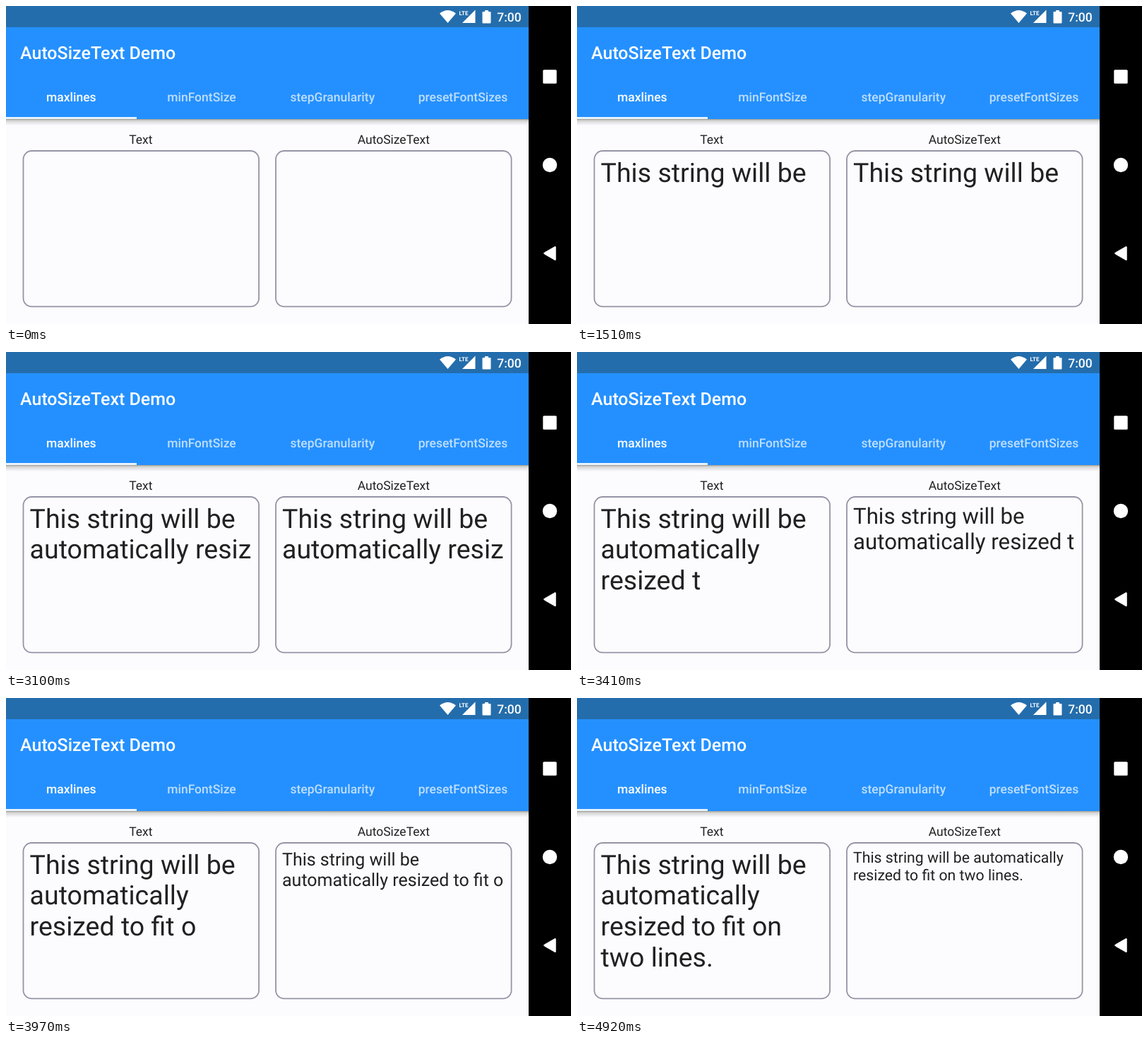
Write an HTML page that moves like this. It is 800 px wide and 450 px high and loops after 7970 ms.

```html
<!DOCTYPE html>
<html lang="en">
<head>
<meta charset="utf-8">
<title>AutoSizeText Demo</title>
<style>
  html, body { margin: 0; width: 100%; height: 100%; overflow: hidden; }
  svg { display: block; font: 17.5px Roboto, sans-serif; text-rendering: geometricPrecision; }
  .medium { font-weight: 500; fill: #fff; }
  .mid { text-anchor: middle; }
  .dim { fill-opacity: .7; }
  .ink { fill: #212121; }
  .white { fill: #fff; }
  .frame { fill: none; stroke: #9494a6; stroke-width: 1.8; }
</style>
</head>
<body>
<svg width="800" height="450" viewBox="0 0 800 450">
  <defs>
    <linearGradient id="shadow" x2="0" y2="1">
      <stop offset="0" stop-color="#4a3c10" stop-opacity=".5"/>
      <stop offset=".25" stop-color="#333328" stop-opacity=".2"/>
      <stop offset="1" stop-color="#333" stop-opacity="0"/>
    </linearGradient>
  </defs>
  <rect width="800" height="450" fill="#fcfcff"/>
  <rect y="160" width="740" height="9" fill="url(#shadow)"/>

  <!-- app bar -->
  <rect width="740" height="160" fill="#2490ff"/>
  <rect width="740" height="30" fill="#246dac"/>
  <rect y="157.2" width="185" height="2.6" class="white"/>
  <text x="20" y="74.5" class="medium" font-size="25">AutoSizeText Demo</text>
  <g class="medium mid">
    <text x="92.3" y="135">maxlines</text>
    <g class="dim">
      <text x="277" y="135">minFontSize</text>
      <text x="462.3" y="135">stepGranularity</text>
      <text x="647" y="135">presetFontSizes</text>
    </g>
    <text x="712.5" y="22">7:00</text>
  </g>

  <!-- status icons -->
  <g class="white">
    <path d="M614 10.5Q625.5 1.5 637 10.5L625.5 24Z"/>
    <path d="M664.5 5.5V24H646Z"/>
    <path d="M678 6h5v2h2.5q1 0 1 1v14.5q0 1-1 1h-10q-1 0-1-1V9q0-1 1-1H678Z"/>
    <text x="641.5" y="13" font-size="8" font-weight="700" font-stretch="75%">LTE</text>
  </g>

  <!-- navigation bar -->
  <rect x="740" width="60" height="450"/>
  <g class="white">
    <rect x="760.3" y="90.3" width="19.4" height="19.4" rx="1.5"/>
    <circle cx="770" cy="225" r="10.2"/>
    <path d="M762.5 350L777.5 341.3V358.7Z" stroke="#fff" stroke-width="2.5" stroke-linejoin="round"/>
  </g>

  <!-- panels -->
  <g class="ink mid">
    <text x="190.8" y="195">Text</text>
    <text x="548.8" y="195">AutoSizeText</text>
  </g>
  <rect class="frame" x="24.5" y="205" width="333.6" height="220.4" rx="12"/>
  <rect class="frame" x="382" y="205" width="333.6" height="220.4" rx="12"/>
  <g class="ink" id="plain"></g>
  <g class="ink" id="fitted"></g>
</svg>
<script>
const LOOP = 7970, DP = 1.25, MAX_SIZE = 30, MIN_SIZE = 12;
const WIDTH = 314.6, TOP = 213.75, ASCENT = 0.9277, LINE = 1.1719;
const MESSAGE = 'This string will be automatically resized to fit on two lines.';

// [letters typed, time in ms]; typing is steady between these points
const TYPING = [
  [0, 0], [1, 40], [4, 290], [6, 460], [9, 680], [11, 850], [13, 1020], [16, 1200],
  [18, 1380], [19, 1510], [21, 1630], [27, 2150], [28, 2190], [31, 2450], [32, 2530],
  [37, 2930], [38, 3020], [41, 3240], [43, 3410], [44, 3500], [46, 3670], [48, 3800],
  [50, 3970], [51, 4060], [55, 4360], [57, 4540], [62, 4920]
];

const plain = document.getElementById('plain');
const fitted = document.getElementById('fitted');
const pen = document.createElement('canvas').getContext('2d');
pen.font = '1000px Roboto, sans-serif';
const measure = text => pen.measureText(text).width / 1000;

function typedAt(time) {
  const next = TYPING.findIndex(([, at]) => at > time);
  if (next < 0) return MESSAGE.length;
  const [n0, t0] = TYPING[next - 1], [n1, t1] = TYPING[next];
  return n0 + Math.floor((n1 - n0) * (time - t0) / (t1 - t0) + 1e-6);
}

function wrap(text, size) {
  const lines = [];
  for (const word of text.split(' ')) {
    const last = lines.length - 1;
    const longer = lines[last] + ' ' + word;
    if (last >= 0 && measure(longer) * size * DP <= WIDTH) lines[last] = longer;
    else lines.push(word);
  }
  return lines;
}

function fitSize(text, maxLines) {
  let size = MAX_SIZE;
  while (size > MIN_SIZE && wrap(text, size).length > maxLines) size--;
  return size;
}

function show(group, x, text, size) {
  const px = size * DP;
  group.innerHTML = wrap(text, size).map((line, i) =>
    `<text x="${x}" y="${TOP + px * (ASCENT + i * LINE)}" font-size="${px}">${line}</text>`
  ).join('');
}

let shown = -1;
function draw() {
  const count = typedAt(performance.now() % LOOP);
  if (count !== shown) {
    shown = count;
    const text = MESSAGE.slice(0, count).trimEnd();
    show(plain, 33.6, text, MAX_SIZE);
    show(fitted, 391, text, fitSize(text, 2));
  }
  requestAnimationFrame(draw);
}
draw();
</script>
</body>
</html>
```
